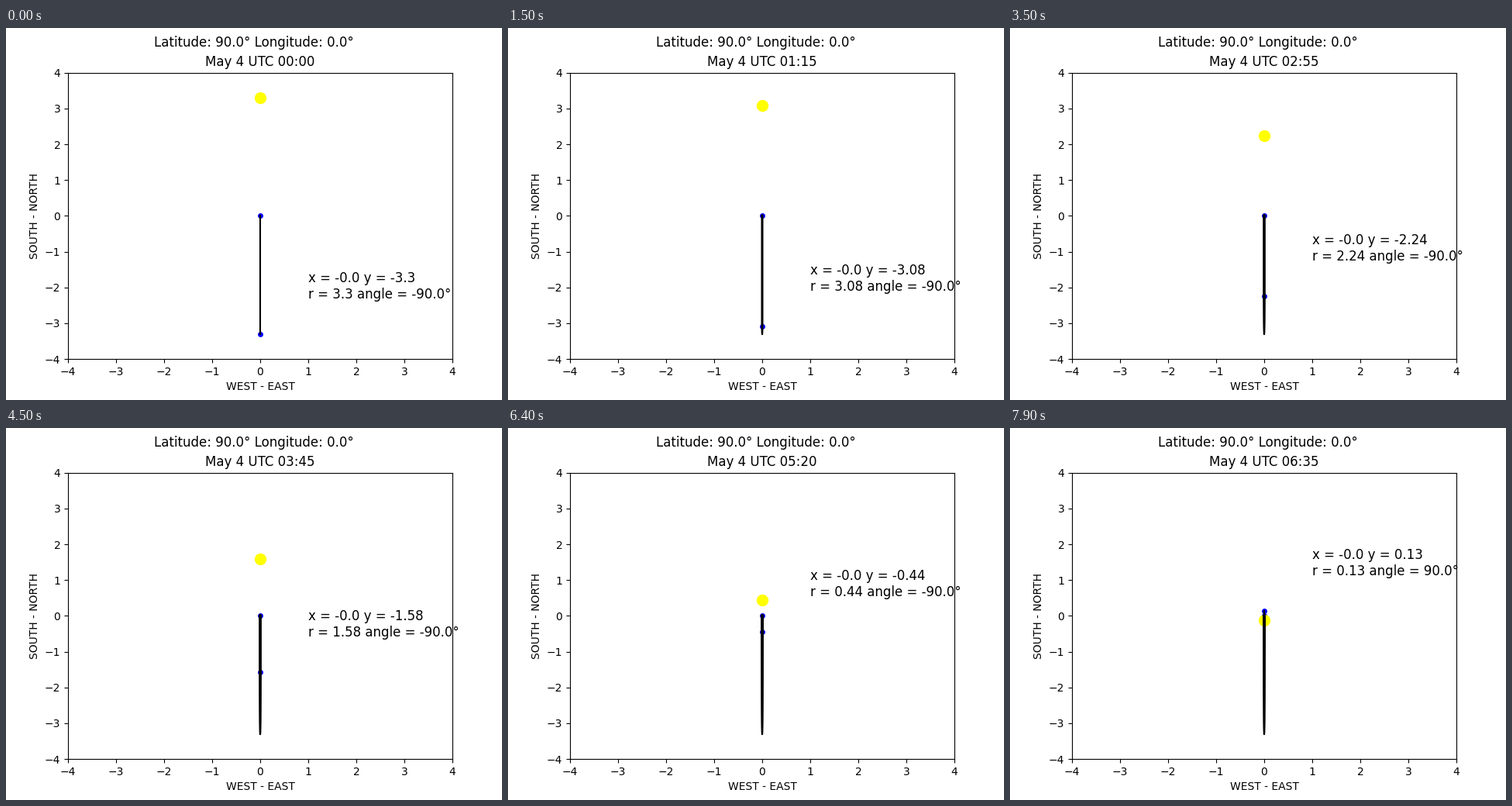
A matplotlib script for the animation above (8 s loop, 640 by 480 pixels).

```python
import numpy as np
import matplotlib.pyplot as plt
from matplotlib.animation import FuncAnimation

FRAMES, STEP = 80, 5  # five minutes of clock time per frame

# North coordinate of the shadow tip over the day (minutes, units)
KNOT_T = np.array([0, 75, 125, 180, 225, 270, 285, 315, 360, 395])
KNOT_Y = np.array([-3.3, -3.084, -2.757, -2.178, -1.578,
                   -0.988, -0.81, -0.49, -0.09, 0.13])
SLOPE = np.gradient(KNOT_Y, KNOT_T, edge_order=2)


def tip(minute):
    """Cubic Hermite curve through the knots."""
    i = np.clip(np.searchsorted(KNOT_T, minute, side="right") - 1,
                0, len(KNOT_T) - 2)
    h = KNOT_T[i + 1] - KNOT_T[i]
    s = (minute - KNOT_T[i]) / h
    return float((1 + 2 * s) * (1 - s) ** 2 * KNOT_Y[i]
                 + s * (1 - s) ** 2 * h * SLOPE[i]
                 + s * s * (3 - 2 * s) * KNOT_Y[i + 1]
                 + s * s * (s - 1) * h * SLOPE[i + 1])


tips = [tip(n * STEP) for n in range(FRAMES)]

fig, ax = plt.subplots(figsize=(6.4, 4.8), dpi=100)
fig.suptitle("Latitude: 90.0° Longitude: 0.0°")
ax.set(xlim=(-4, 4), ylim=(-4, 4), xlabel="WEST - EAST", ylabel="SOUTH - NORTH")
title = ax.set_title("")
dots, = ax.plot([], [], "o", color="blue", ms=4)
sun, = ax.plot([], [], "o", color="yellow", ms=10)
# Shadows pile up, so their soft edges darken with time
shadows = [ax.plot([0, 0], [0, y], color="black", lw=1.5)[0] for y in tips]
label = ax.text(1, 0, "", fontsize=12)


def update(n):
    y = tips[n]
    hour, minute = divmod(n * STEP, 60)
    title.set_text(f"May 4 UTC {hour:02d}:{minute:02d}")
    dots.set_data([0, 0], [0, y])
    sun.set_data([0], [-y])
    for k, line in enumerate(shadows):
        line.set_visible(k <= n)
    angle = 90.0 if y > 0 else -90.0
    label.set_position((1, y + 1))
    label.set_text(f"x = -0.0 y = {round(y, 2)}\n"
                   f"r = {round(abs(y), 2)} angle = {angle}°")
    return [title, dots, sun, label, *shadows]


anim = FuncAnimation(fig, update, frames=FRAMES, interval=100,
                     repeat=True, repeat_delay=0, blit=False)
plt.show()
```
